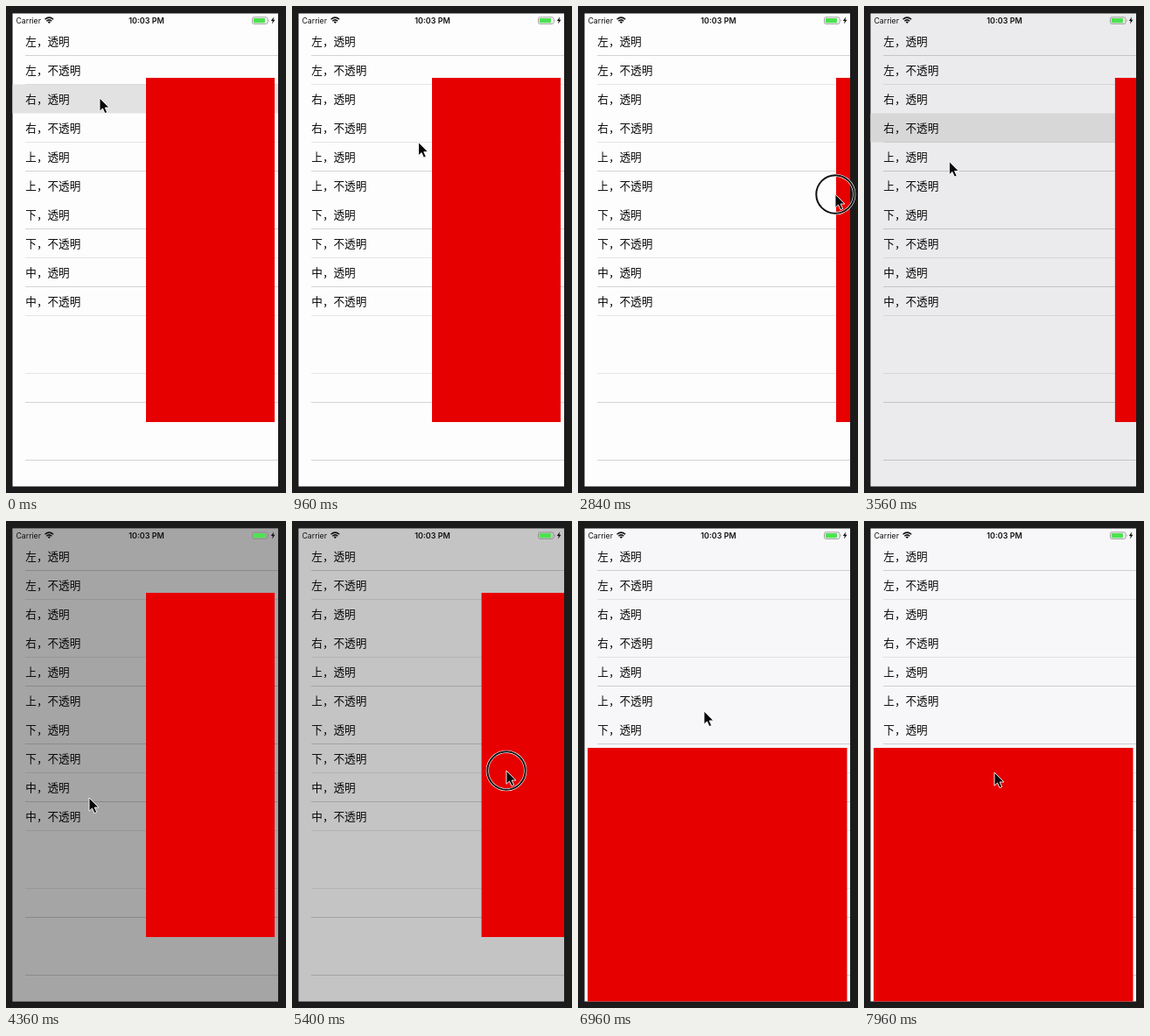
An HTML page that plays this animation: 320 by 556 pixels, repeating every 8000 ms.

```html
<!DOCTYPE html>
<html lang="zh">
<head>
<meta charset="utf-8">
<style>
  html, body { margin: 0; width: 100%; height: 100%; overflow: hidden; background: #1b1b1b; }
  svg { display: block; width: 100vw; height: 100vh; }
  .row { font: 12.6px "Noto Sans CJK SC", "Noto Sans CJK", sans-serif; fill: #080808; }
  .status { font: 8.7px Inter, sans-serif; fill: #111; }
  .clock { font-size: 9px; font-weight: 600; text-anchor: middle; }
</style>
</head>
<body>
<svg viewBox="0 0 320 556" xmlns="http://www.w3.org/2000/svg">
  <clipPath id="screen"><rect x="7.5" y="8.5" width="303.5" height="540"/></clipPath>
  <rect width="320" height="556" fill="#1b1b1b"/>
  <g clip-path="url(#screen)">
    <rect id="page" width="320" height="556"/>
    <rect id="highlight" width="320" height="33" fill="#e2e2e2"/>
    <g id="table"></g>
    <rect id="dim" width="320" height="556"/>
    <rect id="side" y="82" width="147" height="393" fill="#e70000"/>
    <rect id="sheet" x="11" width="296.5" height="300" fill="#e70000"/>
  </g>
  <text class="status" x="11.5" y="20">Carrier</text>
  <text class="status clock" x="160.5" y="20">10:03 PM</text>
  <g fill="none" stroke="#111" stroke-width="1.5">
    <path d="M44.5 15.2Q49.3 11 54.1 15.2M46.3 17.2Q49.3 14.6 52.3 17.2"/>
    <path d="M47.6 18.2Q49.3 16.8 51 18.2L49.3 20Z" fill="#111" stroke="none"/>
  </g>
  <rect x="281.5" y="12.8" width="17.5" height="7.6" rx="1.8" fill="none" stroke="#888" stroke-width=".8"/>
  <rect x="282.8" y="14" width="13.2" height="5.2" rx=".8" fill="#4ee251"/>
  <path d="M300 15.3q1.3 1.3 0 2.6z" fill="#888"/>
  <path d="M306 12.6L302.8 17h2L304 20.6L307.5 15.8h-2z" fill="#111"/>
  <g id="pointer">
    <g id="touch" fill="none">
      <circle r="21.7" stroke="#fff" stroke-width="3.2"/>
      <circle r="21.7" stroke="#111" stroke-width="2"/>
    </g>
    <path d="M0 0V15.2L3.5 12L6 17.6L8.7 16.4L6.2 11H10.9Z" fill="#080808" stroke="#fff" stroke-width=".9"/>
  </g>
</svg>
<script>
const LOOP = 8000;
const ROW = 33;
const FIRST_ROW = 23.5;
const SIDE_X = 160;
const SIDE_WIDTH = 147;
const PULL = 135;
const EXIT = 16;
const REOPEN = 3400;
const RAISE = 6560;

const el = id => document.getElementById(id);
const set = (id, name, value) => el(id).setAttribute(name, value);
const clamp = p => Math.min(1, Math.max(0, p));
const smooth = p => p * p * (3 - 2 * p);
const ramp = (t, from, to) => smooth(clamp((t - from) / (to - from)));

const labels = [...'左右上下中'].flatMap(s => [s + '，透明', s + '，不透明']);
el('table').innerHTML = labels.map((s, i) =>
  `<text class="row" x="22.3" y="${45.2 + i * ROW}">${s}</text>`).join('');

// Hairlines alternate dark and faint; scaling swallows two in every eight.
for (let i = 0; i < 15; i++) {
  if (i % 8 === 2 || i % 8 === 5) continue;
  el('table').innerHTML +=
    `<path d="M22 ${FIRST_ROW + (i + 1) * ROW}H311" stroke="#000" stroke-opacity="${i % 2 ? .09 : .17}"/>`;
}

// Pointer stops: time, x, y.
const stops = [
  [0, 107, 105], [1920, 182, 206], [2840, 294, 215], [3240, 98, 143], [4360, 95, 316],
  [5080, 188, 288], [5800, 324, 281], [6360, 132, 240], [6960, 144, 217], [7960, 149, 287]
];

function pointerAt(t) {
  let [, x, y] = stops[0];
  for (let i = 1; i < stops.length; i++) {
    const [time, nextX, nextY] = stops[i];
    const p = ramp(t, stops[i - 1][0], time);
    x += (nextX - x) * p;
    y += (nextY - y) * p;
  }
  return [x, y];
}

// Follows the finger, then leaves the screen on release.
const drag = (t, from, to) => PULL * ramp(t, from, to) + EXIT * ramp(t, to, to + 100);

function sideOffset(t) {
  if (t < REOPEN) return drag(t, 1920, 2840);
  return (PULL + EXIT) * (1 - ramp(t, REOPEN + 80, REOPEN + 400)) + drag(t, 5080, 5800);
}

function drawHighlight(t) {
  const [row, tapped] = t < REOPEN ? [2, -280] : t < RAISE ? [3, REOPEN] : [6, RAISE];
  set('highlight', 'y', FIRST_ROW + row * ROW);
  set('highlight', 'opacity', t < tapped ? 0 : 1 - ramp(t, tapped + 320, tapped + 700));
  if (t >= RAISE) set('highlight', 'opacity', 1 - ramp(t, RAISE + 80, RAISE + 340));
}

function draw(t) {
  set('pointer', 'transform', `translate(${pointerAt(t)})`);
  const touching = (t >= 1840 && t < 2900) || (t >= 5000 && t < 5840);
  set('touch', 'visibility', touching ? 'visible' : 'hidden');

  const offset = sideOffset(t);
  set('side', 'x', SIDE_X + offset);
  set('dim', 'opacity', t < REOPEN ? 0 : .335 * clamp(1 - offset / SIDE_WIDTH));
  set('page', 'fill', t < REOPEN ? '#fdfdfd' : '#f7f7f9');
  set('sheet', 'y', 259 + 290 * (1 - ramp(t, RAISE + 40, RAISE + 340)));
  drawHighlight(t);
}

const start = performance.now();
function tick() {
  draw((performance.now() - start) % LOOP);
  requestAnimationFrame(tick);
}
tick();
</script>
</body>
</html>
```
